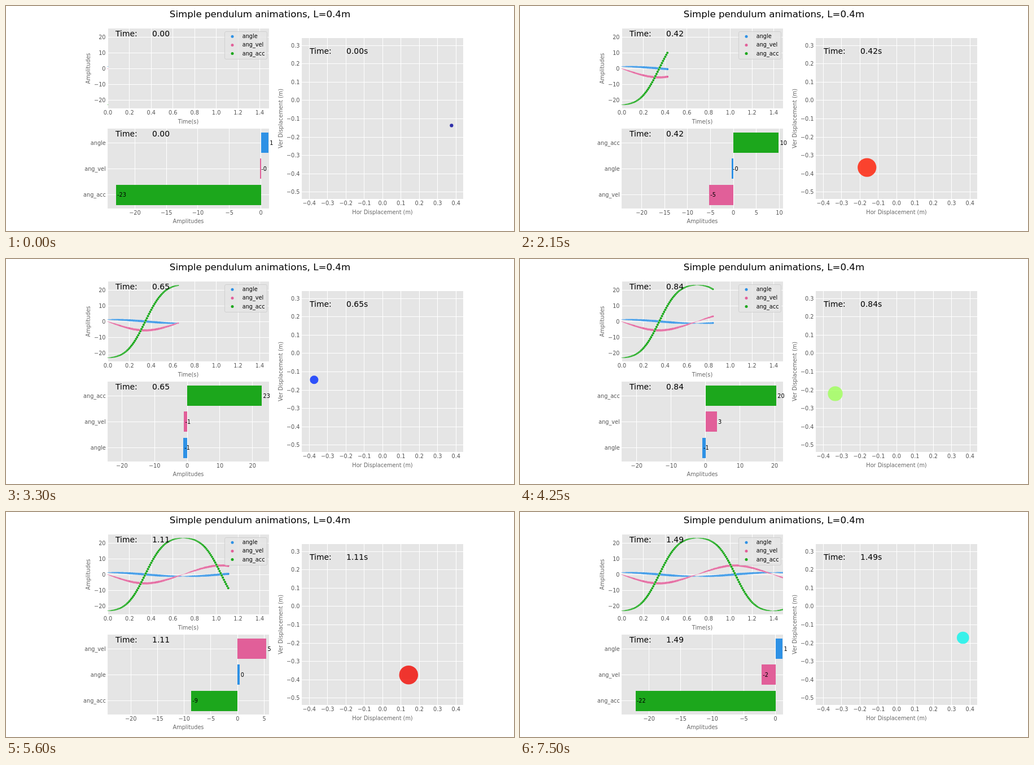
Animation of 900 by 400 pixels, one loop 7550 ms. Source, as an HTML page with a canvas:

```html
<!DOCTYPE html>
<html lang="en">
<head>
<meta charset="utf-8">
<title>Simple pendulum animations</title>
<style>
html, body { margin: 0; width: 100%; height: 100%; overflow: hidden; background: #fff; }
canvas { display: block; }
</style>
</head>
<body>
<canvas id="stage" width="900" height="400"></canvas>
<script>
const ctx = document.getElementById('stage').getContext('2d');
const FRAMES = 150, STEP_MS = 50, LOOP_MS = 7550;
const SMALL = 9.72, MEDIUM = 13.89, LARGE = 16.67;
const TICK = '#555', LABEL = '#666', PANEL = '#e5e5e5';
const SERIES = [
  { name: 'angle', color: '#2e91e5' },
  { name: 'ang_vel', color: '#e15f99' },
  { name: 'ang_acc', color: '#1ca71c' }
];
const LENGTH = 0.4, K = 9.8 / LENGTH;

// Each state holds [angle, velocity, acceleration].
const states = simulate();

function simulate() {
  const out = Array.from({ length: FRAMES }, () => [0, 0, 0]);
  const dt = 0.0005, perFrame = 20;
  let angle = 70 * Math.PI / 180, vel = 0;
  for (let i = 0; i < FRAMES * perFrame; i++) {
    const state = out[Math.floor(i / perFrame)], acc = -K * Math.sin(angle);
    if (i % perFrame === 9) { state[0] = angle; state[2] = acc; }
    if (i % perFrame === 12) state[1] = vel;
    angle += vel * dt;
    vel += acc * dt;
  }
  return out;
}

function text(str, x, y, size = SMALL, color = '#000', align = 'left') {
  ctx.font = `${size}px "DejaVu Sans", sans-serif`;
  ctx.fillStyle = color;
  ctx.textAlign = align;
  ctx.fillText(str, x, y);
}

function verticalText(str, x, y) {
  ctx.save();
  ctx.translate(x, y);
  ctx.rotate(-Math.PI / 2);
  text(str, 0, 0, SMALL, LABEL, 'center');
  ctx.restore();
}

function dot(x, y, r, color) {
  ctx.beginPath();
  ctx.arc(x, y, r, 0, Math.PI * 2);
  ctx.fillStyle = color;
  ctx.fill();
}

function panel(x, y, w, h) {
  ctx.fillStyle = PANEL;
  ctx.fillRect(x, y, w, h);
  return { x, y, w, h };
}

function tickLabel(v, digits) {
  return v.toFixed(digits).replace(/^-(?=0(\.0)?$)/, '').replace('-', '\u2212');
}

function xTicks(box, from, to, step, digits, toX) {
  for (let i = Math.ceil(from / step - 1e-6); i * step <= to + 1e-6; i++) {
    const x = toX(i * step);
    ctx.fillStyle = '#fff';
    ctx.fillRect(Math.round(x - 0.5), box.y, 1, box.h);
    text(tickLabel(i * step, digits), x, box.y + box.h + 11.3, SMALL, TICK, 'center');
  }
}

function yGrid(box, y) {
  ctx.fillStyle = '#fff';
  ctx.fillRect(box.x, Math.round(y - 0.5), box.w, 1);
}

function yTicks(box, from, to, step, digits, toY) {
  for (let i = Math.round(from / step); i <= Math.round(to / step); i++) {
    const y = toY(i * step);
    yGrid(box, y);
    text(tickLabel(i * step, digits), box.x - 3.5, y + 3.5, SMALL, TICK, 'right');
  }
}

function drawHistory(n, clock) {
  const box = panel(180, 40, 286, 142);
  const toX = t => 180.4 + t * 192.2, toY = v => 111 - v * 2.8;
  xTicks(box, 0, 1.49, 0.2, 1, toX);
  yTicks(box, -20, 20, 10, 0, toY);

  ctx.save();
  ctx.beginPath();
  ctx.rect(box.x, box.y, box.w, box.h);
  ctx.clip();
  SERIES.forEach((s, j) => {
    for (let i = 0; i <= n; i++) {
      const x = toX(i / 100), y = toY(states[i][j]);
      const r = 0.3 + 1.8 * Math.sqrt(Math.abs(states[i][1]) / 5.7);
      dot(x, y, r + 0.15, '#fff');
      dot(x, y, r, s.color);
    }
  });
  ctx.restore();

  ctx.beginPath();
  ctx.roundRect(387.5, 45.5, 75, 49, 2.5);
  ctx.fillStyle = 'rgba(229,229,229,.8)';
  ctx.fill();
  ctx.strokeStyle = '#d0d0d0';
  ctx.lineWidth = 1;
  ctx.stroke();
  SERIES.forEach((s, j) => {
    const y = 54.2 + j * 15.2;
    dot(401, y, 2.5, s.color);
    text(s.name, 418.7, y + 3);
  });

  text(clock, 194, 54, MEDIUM);
  text('Time(s)', 323, 209, SMALL, LABEL, 'center');
  verticalText('Amplitudes', 148.5, 111);
}

function drawBars(n, clock) {
  const box = panel(180, 218, 286, 142);
  const state = states[n];
  const low = -24.3, high = 1.1 * Math.max(...state);
  const toX = v => box.x + 0.5 + (v - low) / (high - low) * box.w;
  xTicks(box, low, high, high - low > 45 ? 10 : 5, 0, toX);

  const order = [0, 1, 2].sort((a, b) => state[b] - state[a]);
  const rowY = row => 243 + row * 46.2;
  order.forEach((_, row) => yGrid(box, rowY(row) + 0.3));
  order.forEach((j, row) => {
    const y = rowY(row), end = toX(state[j]);
    const left = Math.round(Math.min(end, toX(0)));
    const right = Math.round(Math.max(end, toX(0)));
    ctx.fillStyle = SERIES[j].color;
    ctx.fillRect(left, Math.round(y - 17.8), Math.max(1, right - left), 36);
    text(state[j].toFixed(0), end + 2.2, y + 3.6);
    text(SERIES[j].name, 176.8, y + 3.8, SMALL, TICK, 'right');
  });

  text(clock, 194, 232, MEDIUM);
  text('Amplitudes', 323, 386, SMALL, LABEL, 'center');
}

function jet(x, alpha) {
  const ramp = (a, b) => Math.min(1, Math.max(0, (x - a) / (b - a)));
  const r = ramp(0.35, 0.66) - 0.5 * ramp(0.89, 1);
  const g = ramp(0.125, 0.375) - ramp(0.64, 0.91);
  const b = 0.5 + 0.5 * ramp(0, 0.11) - ramp(0.34, 0.65);
  return `rgba(${[r, g, b].map(c => Math.round(c * 255))},${alpha})`;
}

function drawPendulum(n, clock) {
  const box = panel(524, 57, 286, 286);
  const toX = v => 667.2 + v * 325, toY = v => 167.9 - v * 325.6;
  xTicks(box, -0.4, 0.4, 0.1, 1, toX);
  yTicks(box, -0.5, 0.3, 0.1, 1, toY);

  const [angle, vel] = states[n], speed = Math.abs(vel);
  dot(toX(LENGTH * Math.sin(angle)), toY(-LENGTH * Math.cos(angle)),
    0.5 + 7 * Math.sqrt(speed), jet(speed / 6, 0.8));

  text(clock + 's', 538, 85, MEDIUM);
  text('Hor Displacement (m)', 667, 370, SMALL, LABEL, 'center');
  verticalText('Ver Displacement (m)', 490, 200);
}

function draw() {
  // The first state is held for one extra step.
  const n = Math.max(0, Math.floor(performance.now() % LOOP_MS / STEP_MS) - 1);
  const clock = 'Time:      ' + (n / 100).toFixed(2);
  ctx.fillStyle = '#fff';
  ctx.fillRect(0, 0, 900, 400);
  text('Simple pendulum animations, L=0.4m', 450, 20, LARGE, '#000', 'center');
  drawHistory(n, clock);
  drawBars(n, clock);
  drawPendulum(n, clock);
  requestAnimationFrame(draw);
}
draw();
</script>
</body>
</html>
```
